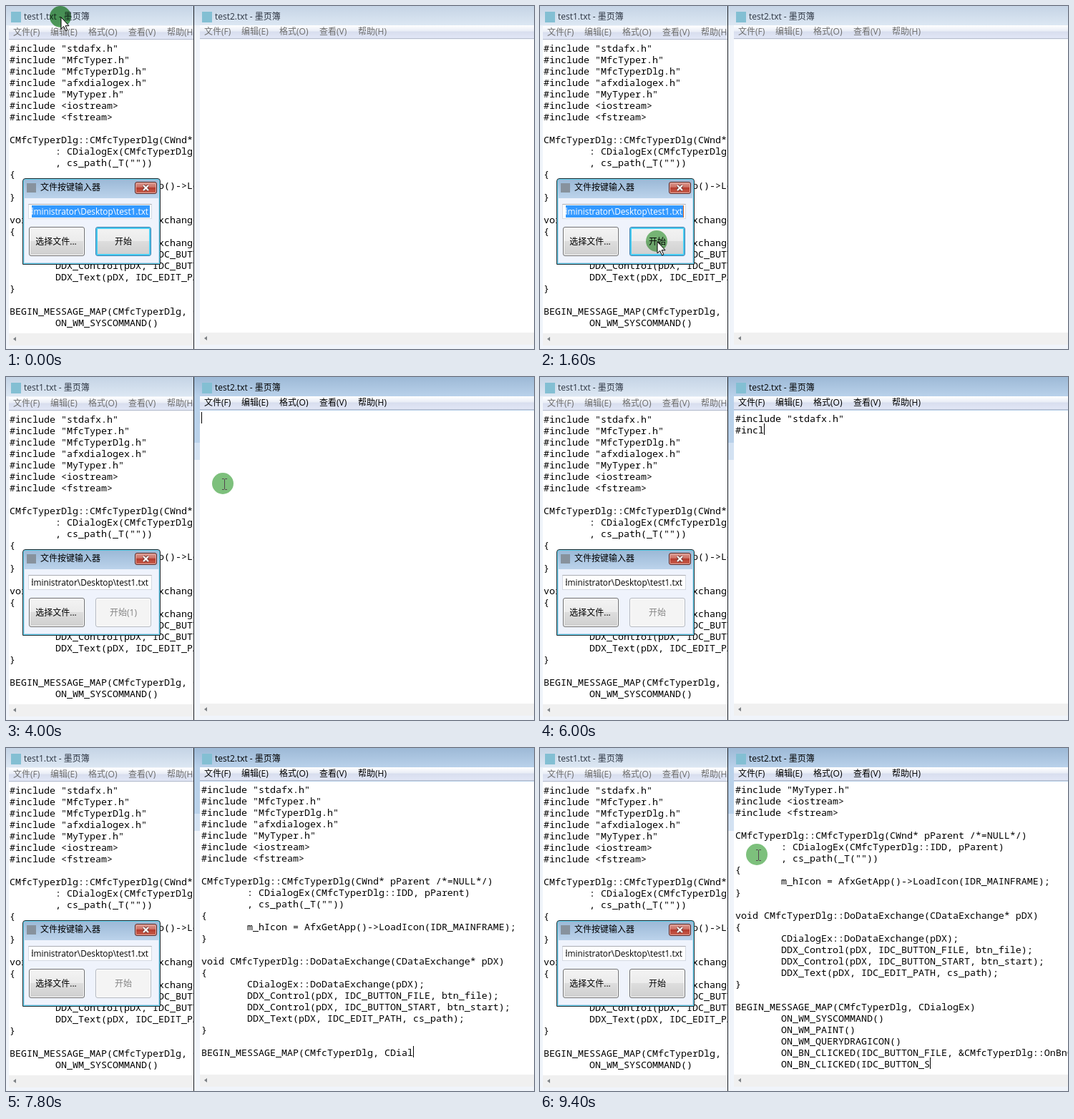
Animation of 738 by 480 pixels, one loop 9800 ms. Source, as an HTML page:

```html
<!DOCTYPE html>
<html lang="zh-CN">
<head>
<meta charset="utf-8">
<title>Typing demo</title>
<style>
html, body { margin: 0; width: 100%; height: 100%; overflow: hidden; background: #fff; }
body { font: 12px/16px "Open Sans", "Noto Sans CJK SC", "Noto Sans CJK", sans-serif; color: #000; }
#stage { position: relative; width: 738px; height: 480px; overflow: hidden; isolation: isolate; }
#stage div, #stage span, #stage pre, #stage svg { position: absolute; box-sizing: border-box; white-space: pre; }
pre { margin: 0; font: 13.333px/16px "Noto Sans Mono", "Liberation Mono", monospace; tab-size: 8; }

.win { top: 0; height: 480px; overflow: hidden; background: #f0f4fa; }
#win1 { left: 0; width: 262px; }
#win2 { left: 262px; width: 476px; border-left: 1px solid #1c1f24; }
.title { left: 0; right: 0; top: 0; height: 27px; background: linear-gradient(#c5d4e5, #dce7f3); color: #2b3340; }
.logo { width: 14px; height: 15px; background: #83bfd3; }
.menu { height: 19px; right: 0; color: #6d6d6d; border-bottom: 1px solid #b6bccc;
  background: linear-gradient(#fff, #e9edf6 45%, #d8deee 50%, #e1e6f6); }
.page { right: 0; background: #fff; overflow: hidden; }
.bar { right: 0; height: 17px; background: #f0f0f0; }
.bar::after { content: ""; position: absolute; left: 6px; top: 5px; border: 3.5px solid transparent; border-right: 4px solid #7c8084; border-left: 0; }
#win2.on { background: linear-gradient(#b9d1ea 92px, #d3e2f2 92px, #d3e2f2 116px, #f0f4fa 116px); }
#win2.on .title { background: linear-gradient(#9db9d6, #b9d1ea); color: #000; }
#win2.on .menu { color: #000; }
#caret { width: 1px; height: 16px; background: #000; }

#dlg { left: 23px; top: 241px; width: 193px; height: 121px; border: 1px solid #20262c; border-radius: 4px 4px 0 0;
  background: linear-gradient(#9ab8d6, #bcd3eb 27px, #b9d1ea); box-shadow: inset 0 0 0 1px #5fd4ee; overflow: hidden; }
#face { left: 2px; top: 27px; right: 2px; bottom: 2px; background: #eff3fc; }
#close { left: 156px; top: 4px; width: 31px; height: 17px; border: 1px solid #5a2320; border-radius: 3px;
  background: linear-gradient(#dd9d94, #ca6a5e 48%, #b53c2f 50%, #c9604d); box-shadow: inset 0 0 0 1px #e4aea6; }
#edit { left: 7px; top: 35px; width: 173px; height: 21px; border: 1px solid #d5dae3; border-top-color: #abadb3; background: #fff; }
#path { left: 4px; top: 1px; width: 165px; height: 17px; font-size: 11.8px; line-height: 17px; overflow: hidden; }
#path span { right: 2px; top: 0; }
#path.sel { background: #39f; color: #fff; }
#bar { left: 168px; top: 1px; width: 1px; height: 17px; background: #d9661f; }
.btn { top: 67px; width: 78px; height: 41px; line-height: 40px; text-align: center; border: 1px solid #707070; border-radius: 3px;
  background: linear-gradient(#f3f3f3, #ebebeb 49%, #dddddd 50%, #cfcfcf); box-shadow: inset 0 0 0 1px #fcfcfc; }
.btn.main { border-color: #3c7fb1; box-shadow: inset 0 0 0 2px #48cdf2; }
.btn.off { border-color: #b5b9c0; background: #f4f4f4; color: #838383; }

#halo { width: 30px; height: 30px; border-radius: 50%; mix-blend-mode: multiply; }
</style>
</head>
<body>
<div id="stage">
  <div id="win1" class="win"></div>
  <div id="win2" class="win"></div>
  <div id="dlg">
    <div class="logo" style="left:5px;top:6px;width:13px;height:13px;background:#87929d"></div>
    <span style="left:24px;top:4px">文件按键输入器</span>
    <div id="close"><svg width="29" height="15" viewBox="0 0 29 15" style="left:0;top:0">
      <path d="M11 4l7 7m0-7l-7 7" stroke="#6d3a36" stroke-width="4"/>
      <path d="M11 4l7 7m0-7l-7 7" stroke="#fff" stroke-width="2.2"/></svg></div>
    <div id="face"></div>
    <div id="edit"><div id="path"><span>dministrator\Desktop\test1.txt</span></div><div id="bar"></div></div>
    <div class="btn" style="left:8px;padding-right:2px">选择文件...</div>
    <div class="btn" id="start" style="left:101px">开始</div>
  </div>
  <div id="halo"></div>
  <svg id="arrow" width="14" height="22" viewBox="0 0 14 22">
    <path d="M1 .8V17l3.7-3.5 2.7 6.3 2.4-1-2.7-6.1H12z" fill="#fff" stroke="#000"/></svg>
  <svg id="beam" width="9" height="18" viewBox="0 0 9 18">
    <path d="M1 1.5h2.5l1 1 1-1H8M4.5 2v14M1 16.5h2.5l1-1 1 1H8" fill="none" stroke="#54454f"/></svg>
</div>
<script>
const $ = id => document.getElementById(id);
const LOOP = 9800, STEP = 200, ROWS = 25;

const code = `#include "stdafx.h"
#include "MfcTyper.h"
#include "MfcTyperDlg.h"
#include "afxdialogex.h"
#include "MyTyper.h"
#include <iostream>
#include <fstream>

CMfcTyperDlg::CMfcTyperDlg(CWnd* pParent /*=NULL*/)
\t: CDialogEx(CMfcTyperDlg::IDD, pParent)
\t, cs_path(_T(""))
{
\tm_hIcon = AfxGetApp()->LoadIcon(IDR_MAINFRAME);
}

void CMfcTyperDlg::DoDataExchange(CDataExchange* pDX)
{
\tCDialogEx::DoDataExchange(pDX);
\tDDX_Control(pDX, IDC_BUTTON_FILE, btn_file);
\tDDX_Control(pDX, IDC_BUTTON_START, btn_start);
\tDDX_Text(pDX, IDC_EDIT_PATH, cs_path);
}

BEGIN_MESSAGE_MAP(CMfcTyperDlg, CDialogEx)
\tON_WM_SYSCOMMAND()
\tON_WM_PAINT()
\tON_WM_QUERYDRAGICON()
\tON_BN_CLICKED(IDC_BUTTON_FILE, &CMfcTyperDlg::OnBnClickedButtonFile)
\tON_BN_CLICKED(IDC_BUTTON_S`;

// x: left of the client area, y: top of the page
function buildWindow(win, name, x, y, menuX) {
  const labels = ["文件(F)", "编辑(E)", "格式(O)", "查看(V)", "帮助(H)"];
  const menu = labels.map((s, i) => `<span style="left:${menuX[i] - x}px;top:1px">${s}</span>`).join("");
  win.innerHTML = `<div class="title"><div class="logo" style="left:${x + 3}px;top:8px"></div>
    <span style="left:${x + 21}px;top:7px">${name} - 墨页簿</span></div>
    <div class="menu" style="left:${x}px;top:${y - 20}px">${menu}</div>
    <div class="page" style="left:${x}px;top:${y}px;height:410px"><pre></pre></div>
    <div class="bar" style="left:${x}px;top:${y + 410}px"></div>`;
  return win.querySelector("pre");
}
const left = buildWindow($("win1"), "test1.txt", 4, 48, [10, 62, 115, 171, 225]);
const right = buildWindow($("win2"), "test2.txt", 8, 47, [14, 66, 119, 175, 229]);
left.style.cssText = "left:1px;top:3px";
left.textContent = code.split("\n").slice(0, ROWS).join("\n");
right.style.cssText = "left:2px;top:3px";
const caret = document.createElement("div");
caret.id = "caret";
right.parentNode.append(caret);

// time, x, y of the pointer
const path = [[0, 76, 15], [800, 143, 130], [1400, 162, 328], [2000, 165, 331],
  [2400, 214, 246], [3400, 301, 151], [3800, 303, 149], [LOOP, 303, 149]];

function pointer(t) {
  const i = path.findIndex(p => p[0] > t);
  const a = path[i - 1], b = path[i], k = (t - a[0]) / (b[0] - a[0]);
  return [a[1] + (b[1] - a[1]) * k, a[2] + (b[2] - a[2]) * k];
}

const within = (t, ...spans) => spans.some(([a, b]) => t >= a && t < b);
const show = (el, on) => { el.style.visibility = on ? "visible" : "hidden"; };
const move = (el, x, y) => { el.style.left = x + "px"; el.style.top = y + "px"; };

const typeStart = 6000, first = 25, mid = code.indexOf("CDialogEx)\n") + 5;
const rate = (mid - first) / 1800;

function drawTyping(t) {
  const n = t < typeStart ? 0 : Math.round(first + (t - typeStart) * rate);
  const text = code.slice(0, n), lines = text.split("\n");
  const top = Math.max(0, lines.length - ROWS);
  right.textContent = lines.slice(top).join("\n");
  const cols = lines[lines.length - 1].replace("\t", " ".repeat(8)).length;
  move(caret, 2 + cols * 8, 2 + (lines.length - 1 - top) * 16);
  show(caret, within(t, [3400, 4600], [5200, 5600], [6000, 9000], [9400, LOOP]));
}

function drawDialog(t) {
  const counting = within(t, [2000, 6000]);
  $("start").textContent = counting ? `开始(${5 - Math.floor(t / 1000)})` : "开始";
  $("start").className = "btn" + (t < 2000 ? " main" : t < 8600 ? " off" : "");
  $("path").className = t < 2000 ? "sel" : "";
  show($("bar"), within(t, [600, 1000], [1600, 2000]));
}

function drawPointer(t) {
  const [x, y] = pointer(t).map(Math.round);
  const seen = !within(t, [typeStart, 8800]), inPage = x > 271;
  $("halo").style.background = within(t, [0, 200], [1800, 2600]) ? "#58a75c" : "#7dc07c";
  move($("halo"), x - 15, y - 15);
  move($("arrow"), x, y);
  move($("beam"), x - 2, y - 8);
  show($("halo"), seen);
  show($("arrow"), seen && !inPage);
  show($("beam"), seen && inPage);
}

const begin = performance.now();
let last = -1;
function frame() {
  const t = Math.floor((performance.now() - begin) % LOOP / STEP) * STEP;
  if (t !== last) {
    last = t;
    $("win2").classList.toggle("on", t >= 3400);
    drawTyping(t);
    drawDialog(t);
    drawPointer(t);
  }
  requestAnimationFrame(frame);
}
frame();
</script>
</body>
</html>
```
